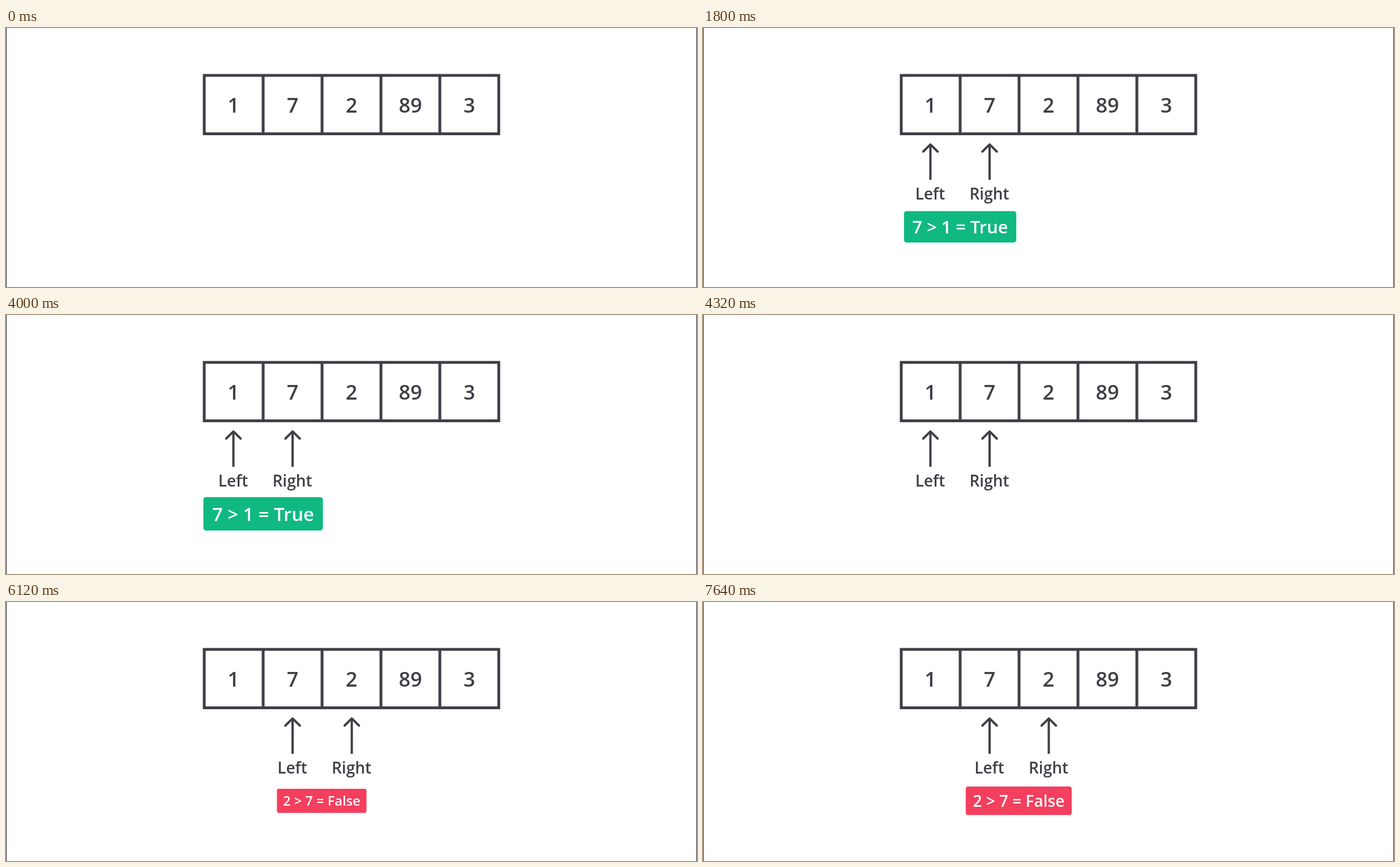
Animation, 1220 px wide and 459 px high, one loop 8000 ms. Source, as an HTML page:

```html
<!DOCTYPE html>
<html lang="en">
<head>
<meta charset="utf-8">
<title>Comparing neighbours in a list</title>
<style>
  html, body { margin: 0; width: 100%; height: 100%; overflow: hidden; background: #fff; }
  svg { display: block; width: 1220px; height: 459px; }
  text { font: 600 28px "Open Sans", "Noto Sans", sans-serif; text-anchor: middle; fill: #3f3f46; }
  .cells text { font-size: 36px; }
  .grid, .arrow { fill: none; stroke: #3f3f46; }
  .grid { stroke-width: 5; }
  .arrow { stroke-width: 4; }
  .head { stroke-linecap: round; stroke-linejoin: round; }
  .edge { fill: #26252d; }
  .badge text { fill: #fff; }
</style>
</head>
<body>
<svg viewBox="0 0 1220 459">
  <defs>
    <g id="arrow" class="arrow">
      <path d="M0 206.5V269"/>
      <path class="head" d="M-12.7 219L0 206.3L12.7 219"/>
    </g>
  </defs>
  <rect class="edge" width="1" height="459"/>
  <rect class="edge" x="1219" width="1" height="459"/>

  <path class="grid" d="M350 84H870V187.5H350ZM454 84V187.5M558 84V187.5M662 84V187.5M766 84V187.5"/>
  <g class="cells">
    <text x="401.5" y="150">1</text>
    <text x="506" y="150">7</text>
    <text x="610" y="150">2</text>
    <text x="714" y="150">89</text>
    <text x="818" y="150">3</text>
  </g>

  <g id="pointers" opacity="0">
    <use href="#arrow" x="401.5"/>
    <text x="401" y="303.5">Left</text>
    <use href="#arrow" x="506"/>
    <text x="505.5" y="303.5">Right</text>
  </g>

  <g id="pass" class="badge" visibility="hidden">
    <rect x="-90" y="-25.3" width="180" height="50.6" rx="4" fill="#10b981"/>
    <text y="10.7">7 &gt; 1 = True</text>
  </g>
  <g id="fail" class="badge" visibility="hidden">
    <rect x="-93.5" y="-25.3" width="187" height="50.6" rx="4" fill="#f43f5e"/>
    <text y="10.7">2 &gt; 7 = False</text>
  </g>
</svg>
<script>
  const LOOP = 8000, STEP = 40, POP = 1200;
  const [pointers, pass, fail] = ["pointers", "pass", "fail"].map(id => document.getElementById(id));

  const progress = (t, from, length) => Math.min(1, Math.max(0, (t - from) / length));
  const smooth = p => p * p * (3 - 2 * p);

  // Elastic ease-out with a period of half the duration.
  function elastic(p) {
    if (p <= 0 || p >= 1) return p <= 0 ? 0 : 1;
    return 1 + 2 ** (-10 * p) * Math.sin((p - 0.125) * 4 * Math.PI);
  }

  // Pops in at `start` and, played backwards, is gone again at `end`.
  function popBadge(el, x, t, start, end) {
    const p = Math.min(progress(t, start, POP), progress(-t, -end, POP));
    const scale = elastic(p);
    el.setAttribute("visibility", scale > 0 ? "visible" : "hidden");
    el.setAttribute("transform", `translate(${x} 352.3) scale(${scale})`);
  }

  function draw(now) {
    const t = Math.floor((now % LOOP) / STEP) * STEP;
    pointers.setAttribute("opacity", progress(t, 240, 240));
    pointers.setAttribute("transform", `translate(${104.5 * smooth(progress(t, 4800, 240))} 0)`);
    popBadge(pass, 454, t, 1440, 4304);
    popBadge(fail, 557.4, t, 6000, Infinity);
  }

  const origin = performance.now();
  function tick() {
    draw(performance.now() - origin);
    requestAnimationFrame(tick);
  }
  tick();
</script>
</body>
</html>
```
